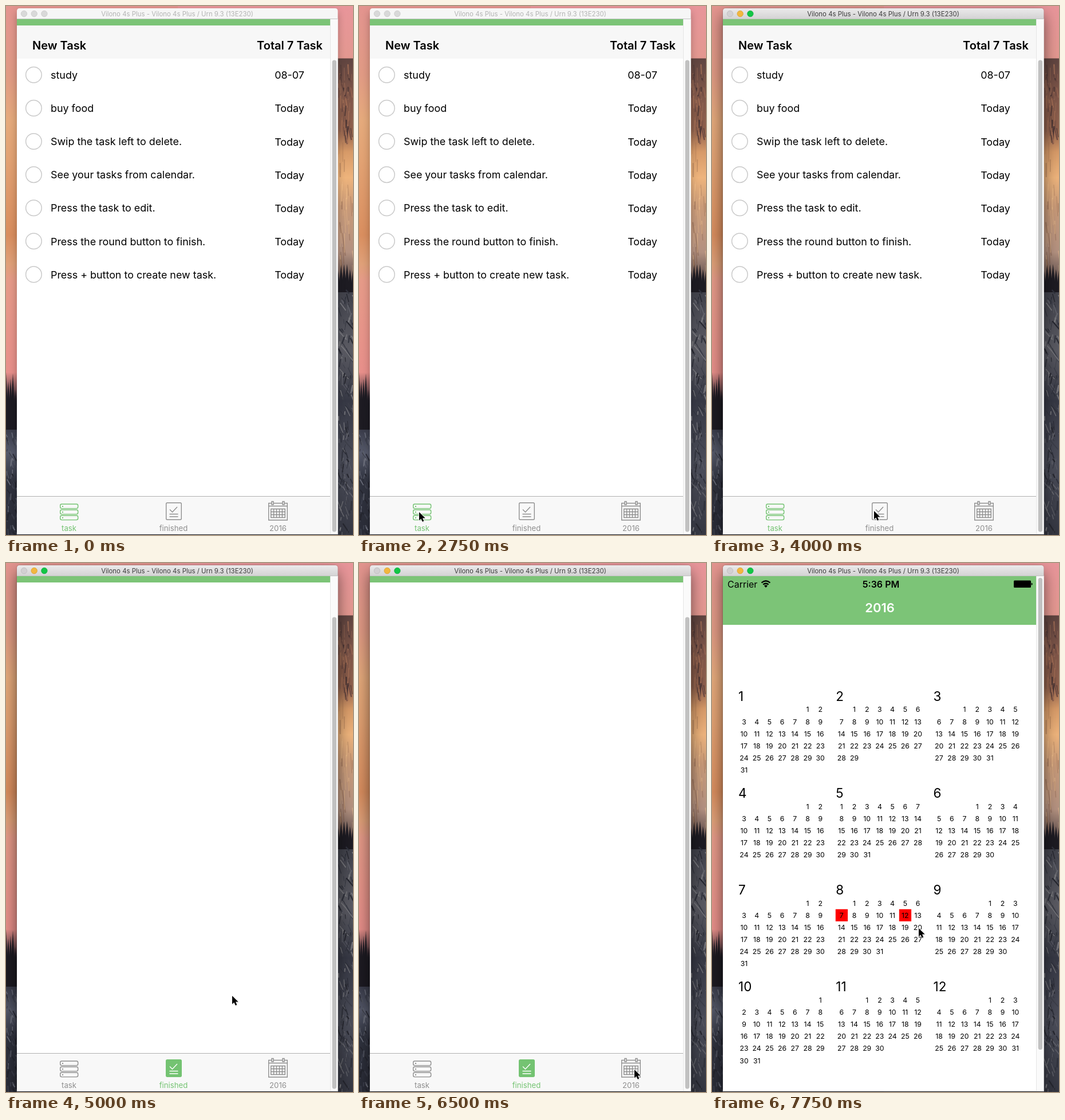
Recreate the animation shown at these times as an HTML page with a canvas. Size 606 by 924 pixels, loop 8 s.

```html
<!DOCTYPE html>
<html lang="en">
<head>
<meta charset="utf-8">
<title>Task list</title>
<style>
html, body { margin: 0; width: 100%; height: 100%; overflow: hidden; background: #d99088; }
canvas, svg { position: absolute; left: 0; top: 0; width: 606px; height: 924px; }
.shade { position: absolute; left: 19px; top: 4px; width: 560px; height: 919px; border-radius: 5px 5px 0 0; box-shadow: 0 6px 14px rgba(0,0,0,.28); }
.active .shade { box-shadow: 0 12px 26px rgba(0,0,0,.55), 0 0 2px rgba(0,0,0,.4); }
text { font-family: Inter, "Liberation Sans", sans-serif; }
.bold { font-weight: 600; }
.mid { text-anchor: middle; }
.line { fill: none; stroke: currentColor; stroke-width: 1.4; }
#title { font-size: 11.4px; fill: #b3b3b3; }
.active #title { fill: #3c3c3c; }
#lights { fill: #d9d9d9; stroke: #c8c8c8; stroke-width: .8; }
.active #lights :nth-child(1) { fill: #d2d0d2; stroke: #bcbabc; }
.active #lights :nth-child(2) { fill: #f2b73f; stroke: #d99e2b; }
.active #lights :nth-child(3) { fill: #12c646; stroke: #0eaa3a; }
#bar { fill: #f6f6f6; }
.active #bar { fill: url(#chrome); }
.tab { color: #8f8f8f; }
.tab.on { color: #74c372; }
.tab text { font-size: 13.2px; fill: currentColor; }
#done.on .line { stroke: #fff; }
#done.on .sheet { fill: currentColor; stroke: currentColor; }
</style>
</head>
<body>
<canvas id="scene" width="606" height="924"></canvas>
<div class="shade"></div>
<svg id="stage" viewBox="0 0 606 924">
  <defs>
    <linearGradient id="chrome" x2="0" y2="1">
      <stop stop-color="#ebeaeb"/><stop offset="1" stop-color="#d3d2d3"/>
    </linearGradient>
    <clipPath id="screen"><path d="M19 23H567V922H19z"/></clipPath>
  </defs>
  <path fill="#fff" d="M19 22H579.5V923H19z"/>
  <path id="bar" d="M19 23V9q0-5 5-5H574.500q5 0 5 5V23z"/>
  <path stroke="#c4c4c4" stroke-width="1" d="M19 22.500H579.500"/>
  <g id="lights"><circle cx="31.500" cy="13.500" r="5.200"/><circle cx="49.200" cy="13.500" r="5.200"/><circle cx="66.900" cy="13.500" r="5.200"/></g>
  <text id="title" class="mid" x="299" y="17.700">Vilono 4s Plus - Vilono 4s Plus / Urn 9.3 (13E230)</text>

  <g clip-path="url(#screen)">
    <g id="page">
      <path fill="#7cc477" d="M19 22H567V108H19z"/>
      <text x="27" y="42.500" font-size="16">Carrier</text>
      <g fill="none" stroke="#000" stroke-width="2.300">
        <path d="M86.500 34.500q7.500-6.500 15 0M89.300 37.700q4.700-4 9.400 0"/>
        <path fill="#000" stroke="none" d="M91 39.800q3-2.400 6 0L94 43z"/>
      </g>
      <text class="bold mid" x="295" y="42.500" font-size="16">5:36 PM</text>
      <path d="M528 30.500h27.500q1.500 0 1.500 1.500v9.500q0 1.500-1.500 1.500H528.500q-1.500 0-1.500-1.500V32q0-1.500 1.500-1.500zM557.700 34.500q2 .5 2 2.200t-2 2.200z"/>
      <g id="tasks">
        <path fill="#f7f7f7" d="M19 108H567V166H19z"/>
        <text class="bold" x="46" y="150" font-size="20">New Task</text>
        <text class="bold" x="553" y="150" font-size="20" text-anchor="end">Total 7 Task</text>
      </g>
      <g id="year">
        <text class="bold mid" x="293" y="86" font-size="22" fill="#fff">2016</text>
      </g>
      <g transform="translate(0 74)">
        <path fill="#f8f8f8" d="M19 856H567V924H19z"/>
        <path stroke="#b0b0b0" d="M19 856.500H567"/>
        <g class="tab" id="list">
          <g class="line">
            <rect x="94.700" y="870" width="31" height="7.600" rx="2.500"/>
            <rect x="94.700" y="880" width="31" height="7.600" rx="2.500"/>
            <rect x="94.700" y="890" width="31" height="7.600" rx="2.500"/>
          </g>
          <path fill="currentColor" d="M98 873h2v2h-2zM98 883h2v2h-2zM98 893h2v2h-2z"/>
          <text class="mid" x="110" y="917">task</text>
        </g>
        <g class="tab" id="done">
          <rect class="line sheet" x="279.700" y="867.700" width="26.600" height="29.600" rx="2"/>
          <path class="line" d="M286 879.500l4.500 4.500 8.500-9M285.500 887.500h15M285.500 892h15"/>
          <text class="mid" x="292.500" y="917">finished</text>
        </g>
        <g class="tab" id="cal">
          <path class="line" d="M463.500 868.500H458.700V898H491.300V868.500H486.500M467.500 868.500H482.500M458.700 873.500H491.300M464 865.500h3v5.500h-3zM483 865.500h3v5.500h-3z"/>
          <path class="line" stroke-width="1.200" d="M462.700 878.500H487.300V893.500H462.700zM462.700 883.500H487.300M462.700 888.500H487.300M467.600 878.500V893.500M472.500 878.500V893.500M477.500 878.500V893.500M482.400 878.500V893.500"/>
          <text class="mid" x="475" y="917">2016</text>
        </g>
      </g>
    </g>
  </g>
  <path fill="#fafafa" d="M567 23H579.500V922H567z"/>
  <path stroke="#e6e6e6" d="M566.500 23V922"/>
  <path stroke="#d8d8d8" d="M19 922.500H579.500"/>
  <rect id="thumb" x="569.700" width="7.300" height="824" rx="3.600" fill="#c1c1c1"/>
  <g id="arrow">
    <path fill="#000" opacity=".18" transform="translate(.8 1.500)" d="M0 0V14.500l3.300-3 2.400 5.300 2.600-1.200-2.300-5h4.700z"/>
    <path stroke="#fff" stroke-width="1.600" paint-order="stroke" d="M0 0V14.500l3.300-3 2.400 5.300 2.600-1.200-2.300-5h4.700z"/>
  </g>
</svg>
<script>
const $ = id => document.getElementById(id);

function add(parent, tag, attrs, label) {
  const el = document.createElementNS('http://www.w3.org/2000/svg', tag);
  for (const key in attrs) el.setAttribute(key, attrs[key]);
  if (label !== undefined) el.textContent = label;
  parent.append(el);
}

['study', 'buy food', 'Swip the task left to delete.', 'See your tasks from calendar.',
 'Press the task to edit.', 'Press the round button to finish.', 'Press + button to create new task.'
].forEach((name, i) => {
  const y = 194.3 + 58.1 * i;
  add($('tasks'), 'circle', { cx: 48.4, cy: y, r: 13.8, fill: '#fff', stroke: '#c9c9c9', 'stroke-width': 1.5 });
  add($('tasks'), 'text', { x: 78, y: y + 6.7, 'font-size': 17.9 }, name);
  add($('tasks'), 'text', { x: 495, y: y + 7, 'font-size': 17.9, class: 'mid' }, i ? 'Today' : '08-07');
});

for (let m = 0; m < 12; m++) {
  const x = 46 + m % 3 * 170.3, y = 232 + Math.floor(m / 3) * 169.2;
  const first = new Date(2016, m, 1).getDay();
  const days = new Date(2016, m + 1, 0).getDate();
  add($('year'), 'text', { x, y: y + 8.5, 'font-size': 22.5 }, m + 1);
  for (let d = 1; d <= days; d++) {
    const cell = first + d - 1;
    const cx = x + 10 + cell % 7 * 22.2, cy = y + 24 + Math.floor(cell / 7) * 21.1;
    if (m === 7 && (d === 7 || d === 12))
      add($('year'), 'rect', { x: cx - 10.5, y: cy - 10.8, width: 21.3, height: 21.2, fill: '#fe0000' });
    add($('year'), 'text', { x: cx, y: cy + 4.4, 'font-size': 12.3, class: 'mid' }, d);
  }
}

// Desktop picture: sky, cliff, trees and rocks along the window's sides.
const ctx = $('scene').getContext('2d');
let seed = 11;
const rnd = () => (seed = seed * 16807 % 2147483647) / 2147483647;

function strip(x, w, stops) {
  const g = ctx.createLinearGradient(0, 0, 0, 924);
  stops.forEach(([y, c]) => g.addColorStop(y / 924, c));
  ctx.fillStyle = g;
  ctx.fillRect(x, 0, w, 924);
}

function streaks(n, x, w, y, h, colors, lean, size) {
  for (let i = 0; i < n; i++) {
    const px = x + rnd() * w, py = y + rnd() * h, len = size * (.4 + rnd());
    ctx.strokeStyle = colors[Math.floor(rnd() * colors.length)];
    ctx.lineWidth = .6 + rnd() * 1.8;
    ctx.beginPath();
    ctx.moveTo(px, py);
    ctx.lineTo(px + lean * len * (rnd() - .3), py + len);
    ctx.stroke();
  }
}

function trees(x, w, y, h, n) {
  ctx.fillStyle = '#1d1b22';
  for (let i = 0; i < n; i++) {
    const px = x + w * i / (n - 1), top = y + rnd() * h * .35;
    ctx.beginPath();
    ctx.moveTo(px, top);
    ctx.lineTo(px + 5, y + h);
    ctx.lineTo(px - 5, y + h);
    ctx.fill();
  }
}

strip(0, 300, [[0, '#e3948f'], [120, '#e09a84'], [200, '#e5aa7c'], [270, '#e2a273'], [400, '#d98e5f'], [450, '#dfa078'], [480, '#e59a88'], [640, '#e78f8a'], [690, '#2b2730'], [740, '#3a3c4a'], [780, '#55596a'], [830, '#30333f'], [924, '#2a2c37']]);
trees(0, 20, 640, 100, 6);
streaks(70, 0, 20, 745, 175, ['#24252e', '#3b3e4b', '#6b6e7b', '#50535f'], 1.2, 10);

strip(300, 306, [[0, '#e8959a'], [91, '#e39890'], [92, '#5f4440'], [150, '#7d5548'], [215, '#8e5f4b'], [255, '#d79a68'], [300, '#eeb47c'], [350, '#c99a78'], [430, '#b39180'], [470, '#6d5a55'], [495, '#40414a'], [600, '#5a5a62'], [690, '#363844'], [800, '#4b4d59'], [924, '#343641']]);
streaks(60, 579, 27, 94, 140, ['#4a3534', '#a36e55', '#6d4a42', '#8d6250'], .4, 18);
streaks(30, 579, 27, 235, 220, ['rgba(120,80,60,.35)', 'rgba(255,205,150,.35)'], .2, 30);
trees(580, 26, 448, 52, 6);
streaks(170, 579, 27, 495, 425, ['#26272f', '#3c3e48', '#77777c', '#5c5d66', '#2f313b'], 1.3, 13);

// time, pointer x, pointer y, scroll offset, tab, window active
const steps = [
  [0, -40, -40, 74, 'list', 0],
  [750, 217, 310, 74, 'list', 0],
  [1000, 196, 268, 74, 'list', 0],
  [1250, 160, 228, 74, 'list', 0],
  [1500, 139, 217, 74, 'list', 0],
  [1750, 188, 282, 74, 'list', 0],
  [2000, 189, 420, 74, 'list', 0],
  [2250, 187, 708, 74, 'list', 0],
  [2500, 161, 739, 74, 'list', 0],
  [2750, 105, 884, 74, 'list', 0],
  [3250, 105, 885, 74, 'list', 1],
  [3500, 110, 885, 74, 'list', 1],
  [3750, 200, 883, 74, 'list', 1],
  [4000, 283, 882, 74, 'list', 1],
  [4250, 284, 882, 74, 'done', 1],
  [4500, 302, 864, 74, 'done', 1],
  [4750, 365, 796, 74, 'done', 1],
  [5000, 395, 756, 74, 'done', 1],
  [5250, 380, 740, 32, 'done', 1],
  [5500, 366, 730, 1, 'done', 1],
  [5750, 366, 730, 1, 'done', 1],
  [6000, 370, 736, 52, 'done', 1],
  [6250, 430, 830, 74, 'done', 1],
  [6500, 481, 885, 74, 'done', 1],
  [6750, 481, 885, 74, 'cal', 1],
  [7000, 450, 800, 74, 'cal', 1],
  [7250, 390, 690, 52, 'cal', 1],
  [7500, 362, 639, 4, 'cal', 1],
  [7750, 361, 638, 0, 'cal', 1]
];
const start = performance.now();

function draw(now) {
  const t = Math.max(0, now - start) % 8000;
  const [, x, y, scroll, tab, active] = steps.findLast(s => s[0] <= t);
  document.body.classList.toggle('active', !!active);
  $('page').setAttribute('transform', `translate(0 ${-scroll})`);
  $('thumb').setAttribute('y', 26 + scroll * .925);
  $('arrow').setAttribute('transform', `translate(${x} ${y})`);
  $('tasks').style.display = tab === 'list' ? '' : 'none';
  $('year').style.display = tab === 'cal' ? '' : 'none';
  for (const id of ['list', 'done', 'cal']) $(id).classList.toggle('on', id === tab);
  requestAnimationFrame(draw);
}
draw(start);
</script>
</body>
</html>
```
